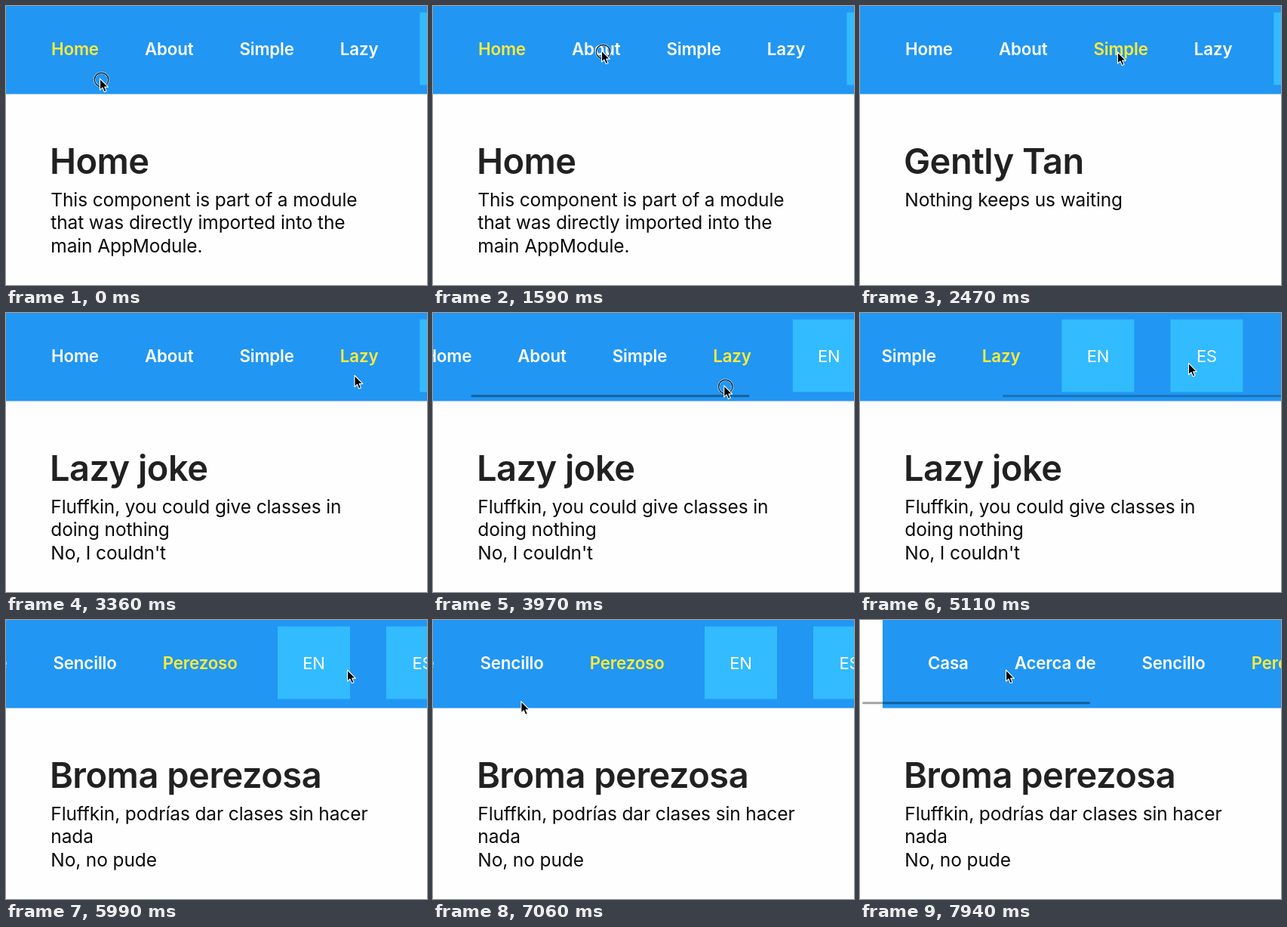
An HTML page for the animation above (8 s loop, 558 by 369 pixels).

```html
<!DOCTYPE html>
<html lang="en">
<head>
<meta charset="utf-8">
<title>Navigation demo</title>
<style>
  html, body { margin: 0; width: 100%; height: 100%; overflow: hidden; background: #fefefe; }
  svg { display: block; width: 558px; height: 369px; }
  text { font-family: Inter, Roboto, sans-serif; white-space: pre; }
  #title { font-size: 47px; font-weight: 600; letter-spacing: -.5px; fill: #212121; }
  #body { font-size: 24.5px; letter-spacing: -.13px; fill: #0a0a0a; }
  #nav { fill: #fff; font-size: 22.3px; letter-spacing: -.15px; }
  .link { font-weight: 600; }
  .active { fill: #ffeb3b; }
  .lang { font-size: 22px; text-anchor: middle; }
</style>
</head>
<body>
<svg viewBox="0 0 558 369">
  <g id="nav"></g>
  <rect id="thumb" y="108.3" height="3" rx="1.5" fill="#000" fill-opacity=".36"/>
  <text id="title" x="57.9" y="222.3"></text>
  <g id="body"></g>
  <g id="pointer">
    <g id="press" fill="none">
      <circle cx="2.5" cy="1.5" r="9.2" stroke="#fff" stroke-opacity=".6" stroke-width="2.8"/>
      <circle cx="2.5" cy="1.5" r="9.2" stroke="#111" stroke-width="1.2"/>
    </g>
    <path d="M.5 0V15.2L4 12 6.3 17.6 9 16.4 6.7 11.1H11.4Z" fill="#000" stroke="#fff" stroke-width="1.1" stroke-linejoin="round"/>
  </g>
</svg>
<script>
const LOOP = 8000, TICK = 88.2, VIEW = 558, TRACK = 555;
const LINK_START = 60, LINK_GAP = 61, BUTTON = 96, BUTTON_STEP = 144;
const $ = id => document.getElementById(id);

const english = { links: ['Home', 'About', 'Simple', 'Lazy'], buttons: 548.4, width: 839 };
const spanish = { links: ['Casa', 'Acerca de', 'Sencillo', 'Perezoso'], buttons: 641, width: 932 };

const pages = [
  { lang: english, active: 'Home', title: 'Home',
    lines: ['This component is part of a module', 'that was directly imported into the', 'main AppModule.'] },
  { lang: english, active: 'About', title: 'About',
    lines: ['This component is also a part of the', 'module that was directly imported.'] },
  { lang: english, active: 'Simple', title: 'Gently Tan', lines: ['Nothing keeps us waiting'] },
  { lang: english, active: 'Lazy', title: 'Lazy joke',
    lines: ['Fluffkin, you could give classes in', 'doing nothing', "No, I couldn't"] },
  { lang: spanish, active: 'Perezoso', title: 'Broma perezosa',
    lines: ['Fluffkin, podrías dar clases sin hacer', 'nada', 'No, no pude'] }
];

// Times are in ticks; every click opens the next page one tick later.
const clicks = [0, 18, 27, 36, 64];
const start = { x: 124, y: 96, scroll: 0 };
const moves = [
  { from: 8, to: 15, x: 223, y: 59 },
  { from: 20, to: 25, x: 328, y: 62 },
  { from: 26, to: 28, x: 341, y: 61 },
  { from: 28, to: 33, x: 472, y: 62 },
  { from: 36, to: 40, x: 451, y: 103 },
  { from: 41.3, to: 53.1, x: 169, y: 73, scroll: 307, drag: true },
  { from: 53.1, to: 56, scroll: 281 },
  { from: 54, to: 58.7, x: 452, y: 66 },
  { from: 72.5, to: 82, x: 73, y: 113 },
  { from: 82, to: 86, x: 400, y: 114, scroll: -40, drag: true },
  { from: 87, to: 90, x: 193, y: 66, scroll: -30 }
];
const [firstDrag, secondDrag] = moves.filter(move => move.drag);

const clamp = (value, min, max) => Math.min(max, Math.max(min, value));
const ease = u => u * u * (3 - 2 * u);

function valueAt(name, tick) {
  return moves.filter(move => name in move).reduce((value, move) => {
    const part = clamp((tick - move.from) / (move.to - move.from), 0, 1);
    return value + (move[name] - value) * ease(part);
  }, start[name]);
}

function showPage({ lang, active, title, lines }) {
  const links = lang.links.map(label =>
    `<text class="link ${label === active ? 'active' : ''}" y="65">${label}</text>`);
  const buttons = ['EN', 'ES'].map((label, i) => {
    const x = lang.buttons + BUTTON_STEP * i;
    return `<rect x="${x}" y="8.5" width="${BUTTON}" height="${BUTTON}" fill="#32bbff"/>
      <text class="lang" x="${x + BUTTON / 2}" y="65">${label}</text>`;
  });
  $('nav').innerHTML = `<rect width="${lang.width}" height="116.5" fill="#2196f3"/>`
    + links.join('') + buttons.join('');

  let x = LINK_START;
  for (const link of document.querySelectorAll('.link')) {
    link.setAttribute('x', x);
    x += link.getComputedTextLength() + LINK_GAP;
  }
  $('title').textContent = title;
  $('body').innerHTML = lines.map((line, i) =>
    `<text x="59.3" y="${265 + 30.3 * i}">${line}</text>`).join('');
}

function placeThumb(scroll, width, opacity) {
  const limit = width - VIEW;
  const inside = clamp(scroll, 0, limit);
  const fullLength = TRACK * VIEW / width;
  const length = fullLength - Math.abs(scroll - inside);
  const left = scroll > limit ? 3 + TRACK - length : 3 + inside / limit * (TRACK - fullLength);
  $('thumb').setAttribute('x', left);
  $('thumb').setAttribute('width', length);
  $('thumb').setAttribute('opacity', opacity);
}

function thumbOpacity(tick) {
  if (tick > secondDrag.from) return 1;
  return tick < firstDrag.from ? 0 : clamp((60 - tick) / 3, 0, 1);
}

let shown;
function draw() {
  const tick = Math.floor(performance.now() % LOOP / TICK + .07);
  const page = pages[Math.max(0, clicks.filter(click => click < tick).length - 1)];
  if (page !== shown) showPage(shown = page);

  const scroll = valueAt('scroll', tick);
  const dragging = [firstDrag, secondDrag].some(({ from, to }) => tick >= from && tick <= to);
  const pressed = dragging || clicks.includes(tick);
  $('nav').setAttribute('transform', `translate(${-scroll})`);
  $('pointer').setAttribute('transform', `translate(${valueAt('x', tick)} ${valueAt('y', tick)})`);
  $('press').setAttribute('visibility', pressed ? 'visible' : 'hidden');
  placeThumb(scroll, page.lang.width, thumbOpacity(tick));
  requestAnimationFrame(draw);
}
draw();
</script>
</body>
</html>
```
